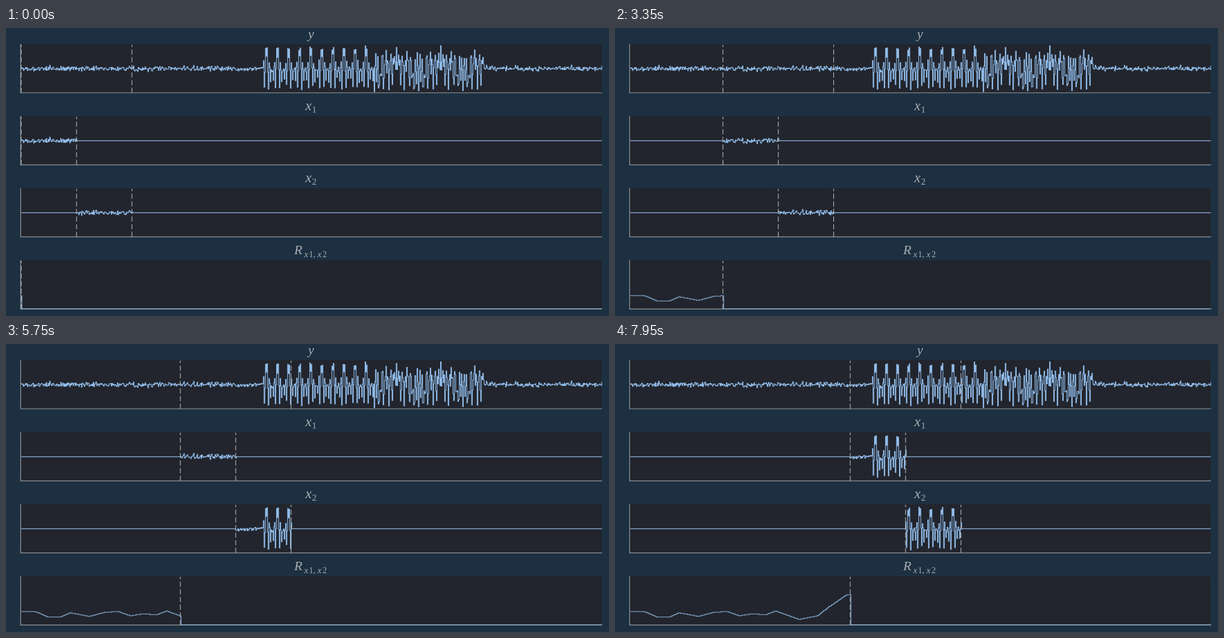
Recreate the animation shown at these times as an HTML page with a canvas. Size 1000x480 px, loop 8000 ms.

```html
<!DOCTYPE html>
<html>
<head>
<meta charset="utf-8">
<style>
  html, body { margin: 0; width: 100%; height: 100%; overflow: hidden; background: #1c3041; }
  canvas { display: block; }
</style>
</head>
<body>
<canvas id="stage" width="1000" height="480"></canvas>
<script>
const ctx = document.getElementById('stage').getContext('2d');
const COUNT = 840, WINDOW = 80, BURST = 350;
const STEP_MS = 50, LOOP_MS = 8000;
const LEFT = 24, RIGHT = 988, HEIGHT = 81.3, GAIN = 237;
const xAt = n => 25.2 + n * 1.1475;
const topOf = i => 26.7 + i * 120.1;

// Real part of an inverse 64-point Fourier sum over signed carriers.
function carrierSum(signs, spacing, phase, n) {
  const half = (signs.length - 1) / 2;
  return [...signs].reduce((sum, c, i) => {
    const weight = c === '+' ? 1 : c === '-' ? -1 : 0;
    return sum + weight * Math.cos(Math.PI * 2 * (i - half) * spacing * n / 64 + phase);
  }, 0) / 64;
}

// Training preamble of an OFDM burst: ten short symbols, guard, two long symbols.
function preamble(n) {
  if (n < 0 || n >= 320) return 0;
  return n < 160
    ? Math.sqrt(13 / 3) * carrierSum('+-+--+0--++++', 4, Math.PI / 4, n)
    : carrierSum('++--++-+-++++++--++-+-++++0+--++-+-+-----++--+-+-++++', 1, 0, n - 192);
}

let seed = 71;
function random() {
  seed = (seed * 16807) % 2147483647;
  return seed / 2147483647;
}
const noise = () => (random() + random() + random() + random() - 2) * 3.5;

const signal = Array.from({ length: COUNT }, (_, n) => noise() - GAIN * preamble(n - BURST));

// Correlation: low wander over noise, then a rise as both windows reach the burst.
const keys = [
  [25, 446], [48, 446], [70, 455], [90, 455], [106, 448], [138, 454],
  [164, 447], [186, 446], [206, 453], [225, 450], [250, 451], [266, 445],
  [305, 459], [336, 453], [352, 440], [384, 418], [988, 418]
];
const correlation = Array.from({ length: COUNT }, (_, n) => {
  const x = xAt(n);
  const i = keys.findIndex(([keyX]) => keyX > x);
  const [x0, y0] = keys[Math.max(i, 1) - 1], [x1, y1] = keys[Math.max(i, 1)];
  return Math.round(y0 + (y1 - y0) * (x - x0) / (x1 - x0));
});

function panel(top) {
  ctx.fillStyle = '#22252d';
  ctx.fillRect(LEFT, top, RIGHT - LEFT, HEIGHT);
  ctx.strokeStyle = '#9a9da1';
  ctx.lineWidth = 1.2;
  ctx.beginPath();
  ctx.moveTo(LEFT + .3, top);
  ctx.lineTo(LEFT + .3, top + HEIGHT);
  ctx.lineTo(RIGHT + .5, top + HEIGHT);
  ctx.stroke();
}

function stairs(valueAt) {
  ctx.strokeStyle = '#90bbe8';
  ctx.lineWidth = 1.15;
  ctx.beginPath();
  for (let n = 0; n < COUNT; n++) {
    const y = valueAt(n);
    ctx.lineTo(xAt(n), y);
    ctx.lineTo(Math.min(xAt(n + 1), RIGHT + .3), y);
  }
  ctx.stroke();
}

function marker(n, top) {
  ctx.strokeStyle = '#b4b5b6';
  ctx.lineWidth = 1.15;
  ctx.setLineDash([8.6, 4.1]);
  ctx.beginPath();
  ctx.moveTo(xAt(n), top + HEIGHT);
  ctx.lineTo(xAt(n), top + 1);
  ctx.stroke();
  ctx.setLineDash([]);
}

function label(text, x, y, size, style = 'italic') {
  ctx.fillStyle = '#a9aeb3';
  ctx.font = `${style} ${size}px "Liberation Serif", serif`;
  ctx.fillText(text, x, y);
}

function titles() {
  label('y', 501, 17, 22);
  ['1', '2'].forEach((digit, i) => {
    label('x', 496.5, 137 + i * 120, 23);
    label(digit, 507.5, 141 + i * 120, 15, 'normal');
  });
  label('R', 478, 377, 22);
  ['1,', '2'].forEach((digit, i) => {
    label('x', 494.5 + i * 22, 382, 15);
    label(digit, 502.5 + i * 22.5, 382, 14, 'normal');
  });
}

function draw(now) {
  const start = 2 * Math.floor((now % LOOP_MS) / STEP_MS);
  const middle = start + WINDOW, end = middle + WINDOW;
  const windowed = (top, from, to) =>
    stairs(n => top + 41 + (n >= from && n <= to ? signal[n] : 0));
  const plots = [
    { trace: top => windowed(top, 0, COUNT), markers: [start, end] },
    { trace: top => windowed(top, start, middle), markers: [start, middle] },
    { trace: top => windowed(top, middle, end), markers: [middle, end] },
    {
      trace: top => stairs(n => n <= start ? correlation[n] : top + HEIGHT - .3),
      markers: [start]
    }
  ];

  ctx.fillStyle = '#1c3041';
  ctx.fillRect(0, 0, 1000, 480);
  titles();
  plots.forEach(({ trace, markers }, i) => {
    const top = topOf(i);
    panel(top);
    trace(top);
    markers.forEach(n => marker(n, top));
  });
  requestAnimationFrame(draw);
}
requestAnimationFrame(draw);
</script>
</body>
</html>
```
